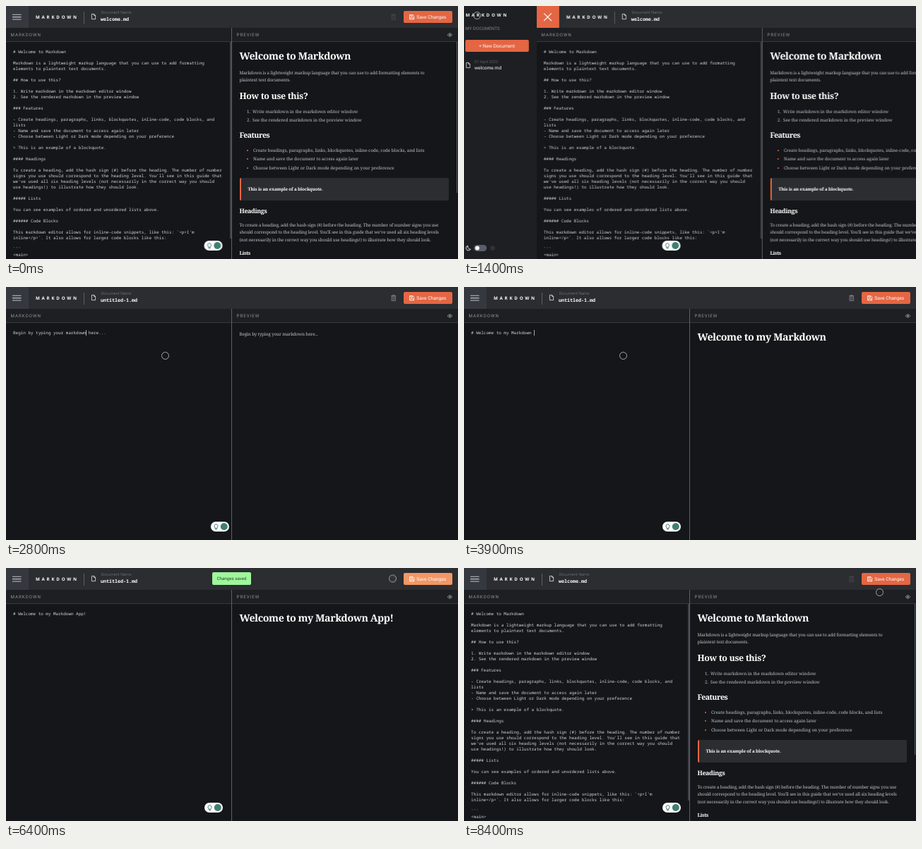
An HTML page for the animation above (8.5 s loop, 640 by 359 pixels).

```html
<!DOCTYPE html>
<html lang="en">
<head>
<meta charset="utf-8">
<title>Markdown editor</title>
<style>
  html, body { margin: 0; width: 100%; height: 100%; overflow: hidden; background: #151619; }
  #stage {
    position: relative; width: 640px; height: 359px; overflow: hidden;
    background: #151619; color: #fff; text-rendering: geometricPrecision;
    --sans: Roboto, "Liberation Sans", sans-serif;
    --slab: "Noto Serif", "Liberation Serif", serif;
    --mono: "Noto Sans Mono", "Liberation Mono", monospace;
    --orange: #e46643; --grey: #7c8187; --line: #5a6069;
  }
  #stage *, #stage { box-sizing: border-box; }
  #stage div, #stage svg { position: absolute; }
  .anim { animation: 8500ms linear infinite both; }
  svg { overflow: visible; fill: none; stroke: currentColor; }

  /* one line of text, centred on its top value */
  .t { white-space: pre; line-height: 10px; margin-top: -5px; font: 6.2px/10px var(--sans); }
  .logo { font: 700 6.2px/10px "Open Sans", Inter, sans-serif; letter-spacing: 2.75px; }
  .label { letter-spacing: 1px; color: #8f949b; }
  .small { font-size: 5.78px; font-weight: 300; color: var(--grey); }
  .name { font-size: 6.67px; }
  .title { font: 600 6.67px/10px var(--mono); }

  /* shell */
  #app { inset: 0; animation-name: drawer; }
  #side { left: -111px; top: 0; width: 111px; height: 359px; background: #1d1f22; }
  #bar { left: 0; top: 0; width: 640px; height: 31px; background: #2b2d31; }
  #menu { left: 0; top: 0; width: 31.5px; height: 31px; background: #35393f; animation-name: menu; }
  #menu svg { left: 9px; top: 8.7px; width: 13px; height: 13px; }
  .rule { background: var(--line); }
  .head { top: 31px; height: 19.5px; background: #1d1f22; }
  .btn { background: var(--orange); border-radius: 2px; }
  #new { left: 10px; top: 47.5px; width: 89.5px; height: 17.5px; animation-name: hoverNew; }
  #save { left: 563px; top: 6.5px; width: 69px; height: 17.5px; animation-name: hoverSave; }
  #underline { left: 134.5px; top: 24px; width: 40px; height: .7px; background: #fff; animation-name: underline; }
  .old { animation-name: old; }
  .draft { animation-name: draft; }
  .open { animation-name: open; }
  .closed { animation-name: closed; }
  #first { animation-name: first; }
  #trash { left: 545px; top: 11px; width: 7.5px; height: 9px; color: #7c8187; animation-name: trash; }

  /* editor and preview */
  pre, #caretRow { position: absolute; left: 10px; top: 61px; margin: 0; font: 5.943px/8px var(--mono); color: #d0d3d8; }
  #caretRow { height: 8px; }
  #caret { top: .3px; width: .7px; height: 7.4px; background: #a4a7ab; }
  .p, .li, .h1, .h2, .h3, .h4, .h5, .q { font-family: var(--slab); color: #c1c4cb; }
  .p { letter-spacing: -.017em; }
  .li { letter-spacing: .003em; }
  .h1, .h2, .h3, .h4, .h5, .q { font-weight: 700; color: #fff; letter-spacing: -.04em; }
  .h1 { font-size: 14.2px; letter-spacing: -.028em; }
  .h2 { font-size: 12.4px; letter-spacing: -.028em; }
  .h3 { font-size: 10.67px; letter-spacing: -.05em; }
  .h4 { font-size: 8.9px; }
  .h5 { font-size: 7.1px; }
  .q { font-size: 6.2px; letter-spacing: -.017em; }
  .dot { width: 2px; height: 2px; margin-top: -1px; border-radius: 1px; background: var(--orange); }
  #quote { left: 330.5px; top: 244px; width: 296.5px; height: 32px; background: #2b2d31; border-left: 2px solid var(--orange); border-radius: 2px; }

  /* layers above */
  #pill { top: 333px; left: 0; width: 26px; height: 14px; border-radius: 7px; background: #fff; animation-name: pill; }
  #pill svg { left: 0; top: 0; width: 26px; height: 14px; }
  #toast { left: 292px; top: 6px; width: 55px; height: 18px; border-radius: 2px; background: #9ff79c; animation-name: toast; }
  #toast .t { left: 0; width: 55px; top: 9.2px; text-align: center; color: #23482a; }
  #veil { inset: 0; background: rgba(21, 22, 25, .5); animation-name: veil; }
  #modal { left: 244px; top: 131px; width: 152px; height: 97px; border-radius: 2px; background: #1d1f22; }
  #modal .btn { left: 10.7px; top: 68.5px; width: 130.7px; height: 17.8px; animation-name: confirm; }
  #cursor { left: -5.5px; top: -5.5px; width: 11px; height: 11px; border: 1px solid #a6a8ab; border-radius: 50%; animation-name: cursor; }

  @keyframes drawer {
    0%, 14.12% { transform: none; animation-timing-function: ease; }
    17.65%, 29.41% { transform: translateX(111px); animation-timing-function: ease; }
    32.9%, 100% { transform: none; }
  }
  @keyframes menu {
    0%, 14% { background: #35393f; }
    14.1%, 18.5% { background: #e46643; }
    21%, 100% { background: #35393f; }
  }
  @keyframes open { 0%, 14% { opacity: 0; } 14.1%, 29.4% { opacity: 1; } 29.5%, 100% { opacity: 0; } }
  @keyframes closed { 0%, 14% { opacity: 1; } 14.1%, 29.4% { opacity: 0; } 29.5%, 100% { opacity: 1; } }
  @keyframes old { 0%, 23.4% { opacity: 1; } 23.5%, 88.1% { opacity: 0; } 88.2%, 100% { opacity: 1; } }
  @keyframes draft { 0%, 23.4% { opacity: 0; } 23.5%, 88.1% { opacity: 1; } 88.2%, 100% { opacity: 0; } }
  @keyframes first { 0%, 23.4% { transform: none; } 23.5%, 88.1% { transform: translateY(27px); } 88.2%, 100% { transform: none; } }
  @keyframes trash {
    0%, 23.4% { opacity: .3; }
    23.5%, 73.5% { opacity: 1; }
    75%, 76.5% { opacity: .15; }
    78%, 88.1% { opacity: 1; }
    88.2%, 100% { opacity: .3; }
  }
  @keyframes underline { 0%, 23.4% { opacity: 0; } 23.5%, 29.4% { opacity: .7; } 30%, 100% { opacity: 0; } }
  @keyframes hoverNew { 0%, 20% { background: #e46643; } 21.5%, 28.5% { background: #f39765; } 31%, 100% { background: #e46643; } }
  @keyframes hoverSave { 0%, 66% { background: #e46643; } 68%, 75.4% { background: #f39765; } 77.5%, 100% { background: #e46643; } }
  @keyframes confirm { 0%, 79.5% { background: #e46643; } 81%, 100% { background: #f39765; } }
  @keyframes toast {
    0%, 70.4% { transform: translateY(-26px); }
    71.6%, 76.5% { transform: none; }
    78.6%, 100% { transform: translateY(-26px); }
  }
  @keyframes veil { 0%, 76.2% { opacity: 0; } 77.6%, 87% { opacity: 1; } 88.6%, 100% { opacity: 0; } }
  @keyframes pill {
    0%, 18.7% { transform: translateX(280.5px); }
    18.8%, 29.6% { transform: translateX(393px); }
    32.94% { transform: translateX(290px); }
    34.1%, 100% { transform: translateX(281px); }
  }
  @keyframes cursor {
    0%, 3.4% { transform: translate(517px, 130px); opacity: 0; }
    3.5% { transform: translate(517px, 130px); opacity: 1; animation-timing-function: ease-in-out; }
    12.94%, 17.65% { transform: translate(18px, 13px); animation-timing-function: ease-in-out; }
    21.18%, 24.12% { transform: translate(54px, 56px); animation-timing-function: ease-in-out; }
    28.24%, 48.8% { transform: translate(225px, 97px); animation-timing-function: ease-in-out; }
    60%, 61% { transform: translate(588px, 69px); animation-timing-function: ease-in-out; }
    68.24%, 71.5% { transform: translate(598px, 15px); animation-timing-function: ease-in-out; }
    75.29%, 76.2% { transform: translate(547px, 14.5px); animation-timing-function: ease-in-out; }
    80% { transform: translate(349px, 205px); }
    83.5%, 87.06% { transform: translate(346px, 207px); animation-timing-function: ease-in-out; }
    96.47% { transform: translate(586px, 37px); }
    98.8%, 100% { transform: translate(588px, 34px); opacity: 1; }
  }
</style>
</head>
<body>
<div id="stage">
  <svg width="0" height="0">
    <symbol id="doc" viewBox="0 0 6 8" overflow="visible"><path d="M.4 .4H3.6L5.6 2.4V7.6H.4ZM3.6 .4V2.4H5.6" stroke-width=".7"/></symbol>
  </svg>

  <div id="app" class="anim">
    <div id="side">
      <div class="t logo" style="left:10.5px;top:13px">MARKDOWN</div>
      <div class="t" style="left:10px;top:31.5px;letter-spacing:.1px;color:#858a91">MY DOCUMENTS</div>
      <div id="new" class="btn anim"><div class="t name" style="left:0;width:89.5px;top:9.3px;text-align:center">+ New Document</div></div>
      <div class="draft anim">
        <svg style="left:10.5px;top:80px" width="6" height="8"><use href="#doc"/></svg>
        <div class="t small" style="left:23px;top:80px">29 September 2023</div>
        <div class="t name" style="left:23px;top:88px">untitled-1.md</div>
      </div>
      <div id="first" class="anim">
        <svg style="left:10.5px;top:80px" width="6" height="8"><use href="#doc"/></svg>
        <div class="t small" style="left:23px;top:80px">01 April 2022</div>
        <div class="t name" style="left:23px;top:88px">welcome.md</div>
      </div>
      <svg style="left:10px;top:339px" width="44" height="9">
        <path d="M3.6 1.2A3.4 3.4 0 1 0 7.4 6A3.6 3.6 0 0 1 3.6 1.2Z" stroke="#fff" stroke-width=".9"/>
        <rect x="12.3" y="0" width="18" height="9" rx="4.5" fill="#5a6069" stroke="none"/>
        <circle cx="17" cy="4.5" r="2.9" fill="#fff" stroke="none"/>
        <g stroke="#5a6069" stroke-width=".8"><circle cx="38.7" cy="4.5" r="1.9"/><circle cx="38.7" cy="4.5" r="3.3" stroke-dasharray=".8 1.79"/></g>
      </svg>
    </div>

    <div id="bar">
      <div id="menu" class="anim">
        <svg class="closed anim"><path d="M0 3.2H12.5M0 6.6H12.5M0 10H12.5" stroke="#c1c4cb" stroke-width="1.1"/></svg>
        <svg class="open anim"><path d="M1.3 1.3L12 12M12 1.3L1.3 12" stroke-width="1.2"/></svg>
      </div>
      <div class="t logo" style="left:42px;top:15.5px">MARKDOWN</div>
      <div class="rule" style="left:110px;top:7.5px;width:.8px;height:17px"></div>
      <svg style="left:121px;top:11.2px" width="6" height="8"><use href="#doc"/></svg>
      <div class="t small" style="left:134.5px;top:10.3px">Document Name</div>
      <div class="t title old anim" style="left:134.1px;top:19.2px">welcome.md</div>
      <div class="t title draft anim" style="left:134.1px;top:19.2px">untitled-1.md</div>
      <div id="underline" class="anim"></div>
      <svg id="trash" class="anim"><path d="M0 1.6H7.5M2.6 1.4V.4H4.9V1.4M1 2.8H6.5V8.5H1ZM2.8 4V7.4M4.7 4V7.4" stroke-width=".9"/></svg>
      <div id="save" class="btn anim">
        <svg style="left:7.5px;top:5.2px" width="7" height="7"><path d="M.5 .5H5L6.8 2.3V6.8H.5ZM2 .6V2.5H4.6V.6M2 6.7V4.4H5.3V6.7" stroke-width=".8"/></svg>
        <div class="t name" style="left:18.3px;top:9px">Save Changes</div>
      </div>
    </div>

    <div class="head" style="left:0;width:319px"><div class="t label" style="left:6.5px;top:9.8px">MARKDOWN</div></div>
    <div class="head" style="left:320px;width:320px">
      <div class="t label" style="left:6.5px;top:9.8px">PREVIEW</div>
      <svg style="left:305px;top:6.5px" width="7" height="6"><path d="M.2 3Q3.5 -1.6 6.8 3Q3.5 7.6 .2 3Z" stroke="#a0a4aa" stroke-width=".8"/><circle cx="3.5" cy="3" r="1.2" fill="#a0a4aa" stroke="none"/></svg>
    </div>
    <div class="rule" style="left:0;top:50px;width:640px;height:1px;opacity:.4"></div>
    <div class="rule" style="left:319px;top:31px;width:1px;height:328px"></div>

    <div id="welcome" class="old anim" style="inset:0">
      <pre id="source"></pre>
      <div id="quote"></div>
      <div class="rule" style="left:317px;top:51px;width:1.5px;height:279px;opacity:.6"></div>
      <div class="rule" style="left:637.5px;top:51px;width:1.5px;height:214px"></div>
    </div>
    <div class="draft anim" style="inset:0">
      <pre id="typed"></pre>
      <div id="caretRow"><div id="caret"></div></div>
      <div id="shown" class="t" style="left:330.5px"></div>
    </div>
  </div>

  <div id="pill" class="anim"><svg>
    <path d="M6 8.2A2.5 2.5 0 1 1 9 8.2V9.6H6ZM6.3 11H8.7" stroke="#2c6a5c" stroke-width=".9"/>
    <circle cx="18.8" cy="7" r="5" fill="#3f7f70" stroke="none"/>
  </svg></div>
  <div id="toast" class="anim"><div class="t">Changes saved</div></div>
  <div id="veil" class="anim">
    <div id="modal">
      <div class="t h4" style="left:10.7px;top:16.5px">Delete this document?</div>
      <div class="t p" style="left:10.7px;top:34.5px">Are you sure you want to delete the</div>
      <div class="t p" style="left:10.7px;top:45px">‘untitled-1.md’ document and its contents?</div>
      <div class="t p" style="left:10.7px;top:55.5px">This action cannot be reversed.</div>
      <div class="btn anim"><div class="t name" style="left:0;width:130.7px;top:9px;text-align:center">Confirm &amp; Delete</div></div>
    </div>
  </div>
  <div id="cursor" class="anim"></div>
</div>

<script>
const $ = id => document.getElementById(id);

$('source').textContent = `# Welcome to Markdown

Markdown is a lightweight markup language that you can use to add formatting
elements to plaintext text documents.

## How to use this?

1. Write markdown in the markdown editor window
2. See the rendered markdown in the preview window

### Features

- Create headings, paragraphs, links, blockquotes, inline-code, code blocks, and
lists
- Name and save the document to access again later
- Choose between Light or Dark mode depending on your preference

> This is an example of a blockquote.

#### Headings

To create a heading, add the hash sign (#) before the heading. The number of number
signs you use should correspond to the heading level. You'll see in this guide that
we've used all six heading levels (not necessarily in the correct way you should
use headings!) to illustrate how they should look.

##### Lists

You can see examples of ordered and unordered lists above.

###### Code Blocks

This markdown editor allows for inline-code snippets, like this: \`<p>I'm
inline</p>\`. It also allows for larger code blocks like this:

\`\`\`
<main>`;

function put(kind, x, y, text = '') {
  const el = document.createElement('div');
  el.className = kind === 'dot' ? kind : 't ' + kind;
  el.style.left = x + 'px';
  el.style.top = y + 'px';
  el.textContent = text;
  $('welcome').append(el);
}

const edge = 330.5;
[
  ['h1', 71.6, 'Welcome to Markdown'],
  ['p', 94.5, 'Markdown is a lightweight markup language that you can use to add formatting elements to'],
  ['p', 105, 'plaintext text documents.'],
  ['h2', 128.4, 'How to use this?'],
  ['h3', 183.8, 'Features'],
  ['h4', 291, 'Headings'],
  ['p', 310.5, 'To create a heading, add the hash sign (#) before the heading. The number of number signs you use'],
  ['p', 321, "should correspond to the heading level. You'll see in this guide that we've used all six heading levels"],
  ['p', 331.5, '(not necessarily in the correct way you should use headings!) to illustrate how they should look.'],
  ['h5', 351, 'Lists'],
].forEach(([kind, y, text]) => put(kind, edge, y, text));
put('q', 342.5, 260, 'This is an example of a blockquote.');

['Write markdown in the markdown editor window', 'See the rendered markdown in the preview window']
  .forEach((text, i) => {
    put('li', 341, 149.5 + i * 12.4, i + 1 + '.');
    put('li', 349, 149.5 + i * 12.4, text);
  });
['Create headings, paragraphs, links, blockquotes, inline-code, code blocks, and lists',
 'Name and save the document to access again later',
 'Choose between Light or Dark mode depending on your preference']
  .forEach((text, i) => {
    put('dot', 341.3, 205 + i * 12.4);
    put('li', 350, 205 + i * 12.4, text);
  });

const LOOP = 8500;
const hint = 'Begin by typing your markdown here...';
const entry = '# Welcome to my Markdown App!';

function draftAt(t) {
  if (t < 2900) return hint;
  const count = t < 3700 ? (t - 3250) / 450 * 16 : 16 + (t - 3700) / 300 * 13;
  return entry.slice(0, Math.max(0, Math.round(count)));
}

function render(t) {
  const text = draftAt(t);
  const heading = text.startsWith('# ');
  $('typed').textContent = text;
  $('shown').className = heading ? 't h1' : 't p';
  $('shown').style.top = (heading ? 71.6 : 66.5) + 'px';
  $('shown').textContent = heading ? text.slice(2) : text;

  const column = t < 2900 ? 'Begin by typing your markdown'.length : text.length;
  const typing = t >= 2900 && t < 4000;
  const lit = t >= 2600 && t < 6000 && (typing || Math.floor(t / 300) % 2 === 1);
  $('caret').style.left = column * .6 + 'em';
  $('caret').style.opacity = lit ? 1 : 0;
}

const start = performance.now();
function tick() {
  render((performance.now() - start) % LOOP);
  requestAnimationFrame(tick);
}
tick();
</script>
</body>
</html>
```
